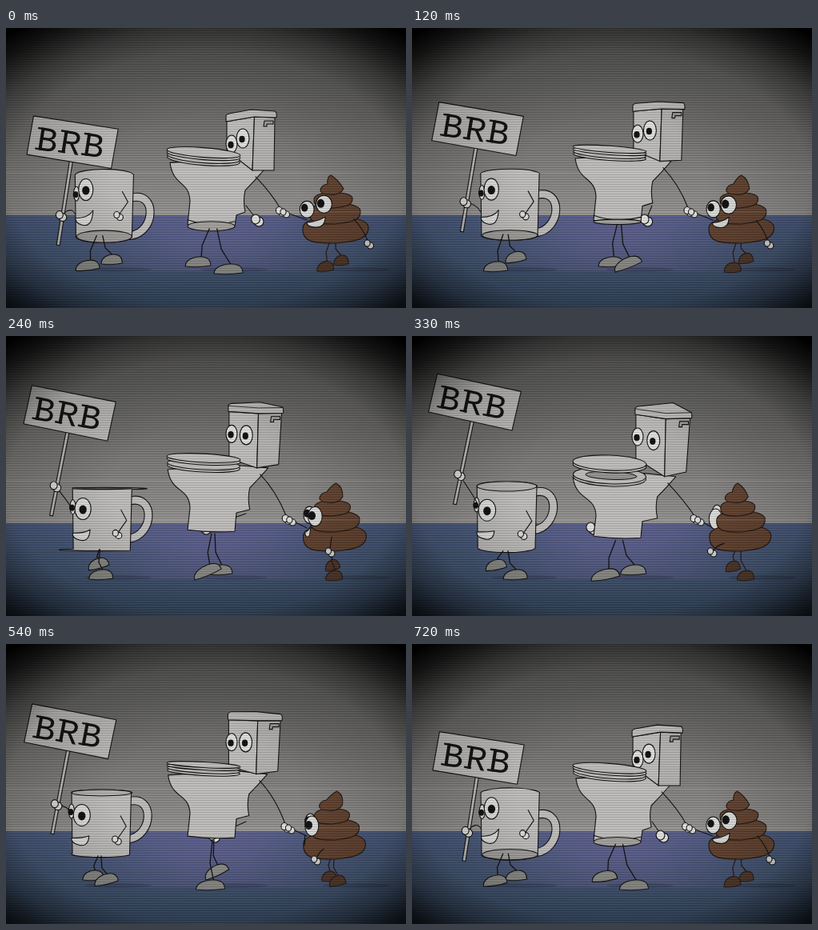
An HTML page with a canvas that plays this animation: 500x350 px, repeating every 0.75 s.

```html
<!DOCTYPE html>
<html lang="en">
<head>
<meta charset="utf-8">
<title>BRB</title>
<style>
html, body { margin: 0; height: 100%; overflow: hidden; background: #000; }
canvas { display: block; }
</style>
</head>
<body>
<canvas id="stage" width="500" height="350"></canvas>
<script>
const c = document.getElementById('stage').getContext('2d');
const LOOP = 750, STEP = 30, LAG = .33;
const INK = '#111', PALE = '#bdbcba', SIDE = '#b1b0ae', SHADE = '#a09f9c', WHITE = '#dededc';
const FOOT = '#8b8b87', BROWN = '#634330', DARK_BROWN = '#523829', BROWN_INK = '#21150f';
const { cos, sin, abs, max, PI } = Math;

function shape(d, fill, width = 1.1, ink = INK) {
  const p = new Path2D(d);
  if (fill) { c.fillStyle = fill; c.fill(p); }
  c.lineWidth = width;
  c.strokeStyle = ink;
  c.stroke(p);
}

function oval(x, y, rx, ry, fill, width = 1.1, tilt = 0) {
  c.beginPath();
  c.ellipse(x, y, rx, ry, tilt, 0, 7);
  c.fillStyle = fill;
  c.fill();
  if (width) { c.lineWidth = width; c.strokeStyle = INK; c.stroke(); }
}

function eye(x, y, rx, ry, px, py, pr) {
  oval(x, y, rx, ry, WHITE);
  oval(px, py, pr * .85, pr, INK, 0);
}

function hand(x, y, size = 1) {
  oval(x + 2, y + 2, 5 * size, 5 * size, WHITE);
  oval(x - 2, y - 1, 4.5 * size, 5 * size, WHITE);
}

// The foot slides along the ground to the right and swings back lifted.
function leg(phase, { x, hipY, swing, ground, lift, size, fill, ink }) {
  const raise = lift * max(0, sin(phase));
  const footX = x + swing * cos(phase), footY = ground - raise;
  const hipX = x + swing * cos(phase) * .25, ankle = footX + size * .25;
  shape(`M${hipX},${hipY}L${(hipX + ankle) / 2 - 4},${(hipY + footY) / 2}L${ankle},${footY - 4}`, null, 1.3, ink);
  c.save();
  c.translate(footX, footY);
  c.rotate(-raise * .045);
  shape(`M${-size},5C${-size},-3 ${-size * .4},-7 ${size * .2},-7Q${size},-7 ${size},4Q0,7 ${-size},5Z`, fill, 1.1, ink);
  c.restore();
}

function walk(phase, legs) {
  leg(phase + PI, { ...legs, ground: legs.ground - 9, size: legs.size * .88 });
  leg(phase, legs);
}

function gradient(y0, y1, ...colours) {
  const g = c.createLinearGradient(0, y0, 0, y1);
  colours.forEach((col, i) => g.addColorStop(i / (colours.length - 1), col));
  return g;
}

function drawRoom() {
  c.fillStyle = gradient(0, 234, '#555453', '#60605e', '#6e6d6b', '#807f7d', '#93918f');
  c.fillRect(0, 0, 500, 234);
  c.fillStyle = gradient(234, 350, '#4a5a7e', '#435672', '#34465e');
  c.fillRect(0, 234, 500, 116);
  const glow = c.createRadialGradient(260, 234, 0, 260, 234, 190);
  glow.addColorStop(0, '#6a609699');
  glow.addColorStop(1, '#6a609600');
  c.fillStyle = glow;
  c.fillRect(0, 234, 500, 70);
  for (const x of [140, 285, 438]) oval(x, 302, 42, 3, '#0f182833', 0);
}

function drawSign(a) {
  const x = 33 + 1.5 * cos(a), y = 78 + 32 * cos(a + .09);
  const tilt = (10.4 - 1.6 * cos(a)) * PI / 180;
  c.save();
  c.translate(x, y);
  c.rotate(tilt);
  shape('M53,49h4V155h-4Z', PALE);
  shape('M0,0L107,0L106,50L-1,49Z', PALE);
  c.fillStyle = INK;
  c.font = '43px "Liberation Mono", monospace';
  for (let i = 0; i < 3; i++) {
    const left = 9 + i * 29;
    c.fillText('BRB'[i], left, 41 - i);
    shape(`M${left},${14 - i}h7M${left},${39.8 - i}h7`, null, 2.4);
  }
  c.restore();
  return [x + 53 * cos(tilt) - 118 * sin(tilt), y + 53 * sin(tilt) + 118 * cos(tilt)];
}

// In every figure, view runs from -1 (seen from below) to 1 (seen from above).
function drawMug(a) {
  const grip = drawSign(a);
  const view = -cos(a - LAG);
  const top = 185 - 5 * cos(2 * a - 1.2), end = top + 76.5;
  const l = 83.5 - 3 * view, r = 157.5 - 2 * view;
  const mid = (l + r) / 2, rx = (r - l) / 2, ry = 8 * abs(view);

  const hy = top + 18 - 12 * view;
  const handle = `M${r - 4},${hy}C${r + 30},${hy - 10} ${r + 28},${hy + 43} ${r - 4},${hy + 47}`;
  shape(handle, null, 11);
  shape(handle, null, 8.8, PALE);
  shape(`M${l},${top}A${rx},${ry} 0 0 1 ${r},${top + 2}L${r - 2},${end + 2}A${rx - 2},${ry} 0 0 1 ${l + 1},${end}Z`, PALE);
  if (view > 0) oval(mid, top + 1, rx, ry, SIDE);
  else oval(mid, end + 1, rx - 2, ry, SHADE);
  walk(a - LAG + PI, { x: 117, hipY: end + max(0, 7 * view), swing: 16, ground: 299, lift: 5, size: 15, fill: FOOT });

  const farX = 84 - 4.3 * view, ex = 96.5 - 3.5 * view, ey = top + 25.5 + 7 * view;
  eye(farX, top + 24, 3.5, 9, farX - 1, top + 25, 4);
  eye(ex, ey, 10 + view, 13.5, ex, ey + 1, 5.5);
  const my = ey + 31 - 5 * view;
  shape(`M${ex - 13},${my}Q${ex + 3},${my} ${ex + 9},${ey + 26}Q${ex + 8},${my + 13} ${ex - 6},${my + 8}Q${ex - 13},${my + 6} ${ex - 13},${my}Z`, WHITE);

  const hx = 139 - 1.5 * view, handY = top + 57 + 6 * view;
  shape(`M${hx + 5},${handY - 30}L${hx + 12},${handY - 17}L${hx},${handY}`);
  hand(hx, handY, .8);
  const sy = 219 - 14 * view;
  shape(`M${l},${sy}Q${l - 5},${sy - 10} ${grip}`);
  hand(...grip);
}

function drawToilet(a) {
  const view = -cos(a), bob = 6 * cos(2 * a);
  // Tank corners: left, middle and right, at the top and the bottom
  const y = 102 + bob;
  const ax = 277 + 2 * view, ay = y - 9 * view;
  const bx = 314 + 3.5 * view, by = y - 3 * view;
  const cx = 344 + 6 * view, cy = y - 4 * view;
  const ex = 312 + 4 * view, ey = 170 + 1.33 * bob;
  const fx = 339 + 4 * view, fy = ey - 3 - 3 * view;
  // Bowl rim and base
  const lx = 203 - 2 * view, ly = 168 + 5 * view + .9 * bob;
  const px = 227, qx = 286, py = 244 + 3 * view + .8 * bob, qy = py + 2;

  const backX = 268 + 46 * cos(a);
  shape(`M300,222L${backX},240`);
  hand(backX, 240, 1.2);

  const belly = max(py, qy) + 2 + 8 * max(0, -view);
  shape(`M${lx},${ly}C${lx + 4},${ly + 30} ${px + 2},${ly + 22} ${px + 3},${ly + 48}L${px},${py}Q256,${belly} ${qx},${qy}L${qx + 2},${ey + 56}L${ex - 9},${ey + 52}Q${ex - 12},${ey + 38} ${ex - 9},${ey + 25}Q${ex + 2},${ey + 14} ${ex + 14},${ey}L290,${ly - 5}Z`, PALE);
  if (view < -.3) {
    shape(`M${px},${py - 6}Q256,${py + 4} ${qx},${qy - 6}`);
    oval((px + qx) / 2, (py + qy) / 2 + 1, (qx - px) / 2, -6 * view, SHADE);
  }
  walk(a, { x: 259, hipY: py + 5, swing: 19, ground: 302, lift: 9, size: 18, fill: FOOT });

  shape(`M${ax + 1},${ay}L${bx},${by}L${ex},${ey}L${ax + 1},153Z`, PALE);
  shape(`M${bx},${by}L${cx - 2},${cy}L${fx},${fy}L${ex},${ey}Z`, SIDE);
  const above = max(0, view);
  const backTopX = bx - 4 + 14 * above, backTopY = by - 9 - 12 * above;
  shape(`M${ax},${ay}V${ay - 7}Q${ax},${ay - 9} ${ax + 4},${ay - 10}L${backTopX},${backTopY}L${cx - 2},${cy - 8}Q${cx + 1},${cy - 7} ${cx},${cy}L${bx},${by}Z`, PALE);
  if (view > .3) shape(`M${ax},${ay - 7}L${bx},${by - 7}L${cx},${cy - 7}`, null, .8);
  shape(`M${cx - 15},${cy + 4}h11v4h-8v3h-4Z`, SHADE);
  const e2 = 299 + 3 * view;
  eye(282, ay + 28, 7, 11, 281, ay + 29, 4.3);
  eye(e2, by + 27, 8, 12, e2 - 1, by + 28, 4.3);

  // The lid pops open once per loop
  const gap = 5 + 10 * max(0, cos(a - 2.7)) ** 6;
  const sy = 155 + 2 * view + .6 * bob, ry = 2 + 6 * abs(view) + 2 * view, tilt = .06 - .02 * view;
  oval(247, sy + gap + 3, 45.5, ry + 1, PALE, 1.1, tilt);
  oval(247, sy + gap, 45.5, ry + 1, PALE, 1.1, tilt);
  if (gap > 9) oval(249, sy + gap, 32, 5, '#92928f', 1, tilt);
  oval(247, sy + 2, 46, ry, PALE, 1.1, tilt);
  oval(247, sy - 1, 46, ry, PALE, 1.1, tilt);

  const gx = 351 + 5.5 * view, gy = 230;
  shape(`M${ex + 4},${ey + 8}Q${ex + 24},${ey + 29} ${gx - 3},${gy - 5}`);
  shape(`M${gx + 3},${gy}L376,240`);
  hand(gx - 2, gy - 1, .9);
  hand(gx + 3, gy + 1, .8);
}

function tier(x, y, w, h) {
  shape(`M${x - w},${y}C${x - w},${y - h} ${x + w - 3},${y - h} ${x + w},${y - 2}C${x + w + 2},${y + h * .8} ${x + w * .5},${y + h * .9} ${x},${y + h}C${x - w * .6},${y + h} ${x - w - 1},${y + h} ${x - w},${y}Z`, BROWN, 1.1, BROWN_INK);
}

function drawPile(a) {
  const turn = (1 - cos(a - LAG)) / 2, away = turn > .75;
  const y = 250, tipX = 410 - 4 * cos(2 * a), tipY = y - 66;
  const drawEyes = () => {
    const ex = 376 + 6 * turn, ey = 227 - 6 * turn;
    const fx = 398 - 21 * turn, fy = 220 + 10 * turn;
    eye(ex, ey, 9 - 3 * turn, 10.5, ex - 3, ey - 2, away ? 0 : 5);
    eye(fx, fy, 10 - 2 * turn, 11 + 2 * turn, fx - 4, fy - 1, away ? 0 : 5.5);
  };
  walk(a - LAG + PI, { x: 409, hipY: y + 12, swing: 10.5, ground: 300, lift: 4, size: 10.5, fill: DARK_BROWN, ink: '#2a1d17' });
  if (away) drawEyes();
  tier(412 - 2 * turn, y, 41 - 3 * turn, 19);
  tier(411, y - 20, 32 - 2 * turn, 15);
  tier(409 - 2 * turn, y - 36, 24 - 3 * turn, 11);
  const x = 409 - 2 * turn, ty = y - 47;
  shape(`M${x - 16},${ty}Q${x - 15},${ty - 7} ${x - 7},${ty - 8}Q${tipX - 5},${tipY + 2} ${tipX},${tipY}Q${tipX + 9},${tipY + 5} ${x + 13},${ty - 2}Q${x + 8},${ty + 7} ${x - 6},${ty + 5}Q${x - 15},${ty + 5} ${x - 16},${ty}Z`, BROWN, 1.1, BROWN_INK);
  if (!away) {
    drawEyes();
    const mx = 376 - 4 * turn, my = 243 + 4 * turn, w = 24 * (1 - turn * 1.3);
    shape(`M${mx},${my}Q${mx + w * .6},${my - 1} ${mx + w},${my - 7}Q${mx + w},${my + 6} ${mx + w * .5},${my + 6}Q${mx},${my + 6} ${mx},${my}Z`, WHITE);
  }
  const reach = cos(a - LAG), hx = 410 + 46 * reach;
  shape(`M${410 + 26 * reach},${238 + 24 * turn}Q${410 + 40 * reach},${252 + 12 * turn} ${hx},270`);
  hand(hx, 270, .8);
}

function drawScreen() {
  for (let y = 0; y < 350; y += 3) {
    c.fillStyle = '#00000022';
    c.fillRect(0, y, 500, 1);
    c.fillStyle = '#ffffff0c';
    c.fillRect(0, y + 1, 500, 1);
  }
  c.fillStyle = '#ffffff14';
  c.fillRect(0, 180, 500, 2);
  c.fillRect(0, 229, 500, 2);
  c.save();
  c.translate(250, 190);
  c.scale(1.55, 1);
  const g = c.createRadialGradient(0, 0, 0, 0, 0, 250);
  g.addColorStop(.3, '#0000');
  g.addColorStop(.64, '#00000028');
  g.addColorStop(.76, '#00000068');
  g.addColorStop(.88, '#000000c8');
  g.addColorStop(.97, '#000');
  c.fillStyle = g;
  c.fillRect(-170, -190, 340, 350);
  c.restore();
}

function frame(now) {
  const angle = Math.floor(now % LOOP / STEP) * STEP / LOOP * 2 * PI;
  drawRoom();
  drawMug(angle);
  drawToilet(angle);
  drawPile(angle);
  drawScreen();
  requestAnimationFrame(frame);
}
c.lineJoin = c.lineCap = 'round';
frame(performance.now());
</script>
</body>
</html>
```
